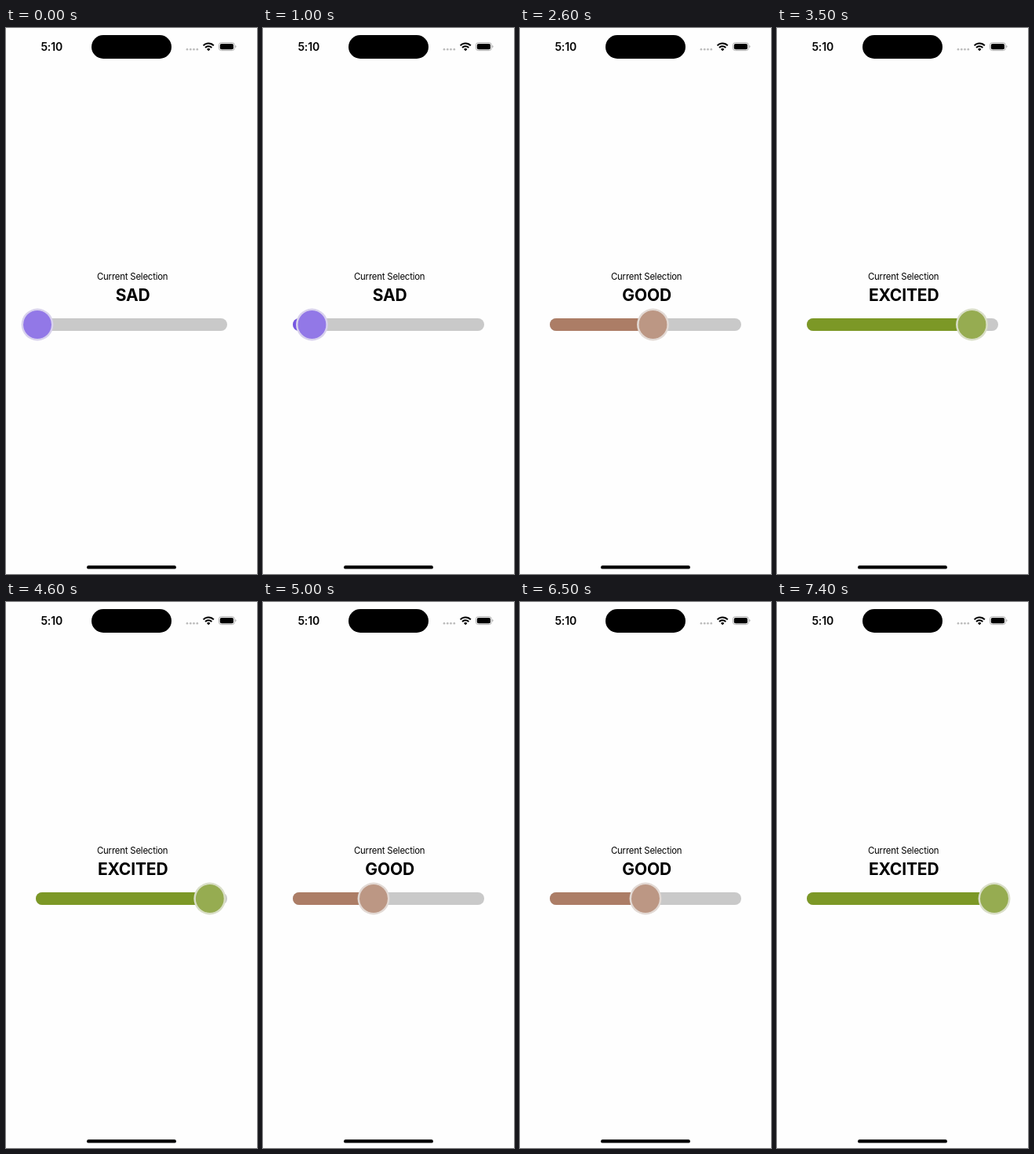
An HTML page for the animation above (8000 ms loop, 320 by 694 pixels).

```html
<!DOCTYPE html>
<html lang="en">
<head>
<meta charset="utf-8">
<title>Mood slider</title>
<style>
  html, body { margin: 0; width: 100%; height: 100%; overflow: hidden; background: #fefefe; }
  svg { display: block; width: 100%; height: 100%; }
  text { font-family: Inter, Roboto, sans-serif; text-anchor: middle; }
</style>
</head>
<body>
<svg viewBox="0 0 320 694">
  <defs>
    <clipPath id="trackClip"><rect x="38" y="369" width="244" height="16" rx="8"/></clipPath>
  </defs>
  <rect width="320" height="694" fill="#fefefe"/>

  <!-- Status bar -->
  <text x="58.3" y="28.7" font-size="14" font-weight="600" letter-spacing="-0.1">5:10</text>
  <rect x="109" y="9" width="102" height="30" rx="15"/>
  <g fill="#bdbdbd">
    <circle cx="231" cy="27.2" r="1.35"/>
    <circle cx="235.3" cy="27.2" r="1.35"/>
    <circle cx="239.5" cy="27.2" r="1.35"/>
    <circle cx="243.8" cy="27.2" r="1.35"/>
  </g>
  <g fill="none" stroke="#000" stroke-width="2">
    <path d="M251.6 22.4a9.1 9.1 0 0 1 13.2 0"/>
    <path d="M254.1 25a5.7 5.7 0 0 1 8.2 0"/>
  </g>
  <path d="M256 26.9a3 3 0 0 1 4.4 0l-2.2 2.3z"/>
  <rect x="271.4" y="18.6" width="20" height="10" rx="3.2" fill="none" stroke="#a8a8a8" stroke-width=".9"/>
  <rect x="272.8" y="20" width="17.2" height="7.2" rx="2"/>
  <path d="M292.4 22v3.2a1.7 1.7 0 0 0 0-3.2z" fill="#a8a8a8"/>

  <!-- Slider -->
  <text x="161.2" y="320" font-size="11.4" letter-spacing="-0.2">Current Selection</text>
  <text id="label" x="161.7" y="347.4" font-size="21" font-weight="700" letter-spacing="-0.15"></text>
  <g clip-path="url(#trackClip)">
    <rect x="38" y="369" width="244" height="16" fill="#c9c9c9"/>
    <rect id="fill" class="tint" x="38" y="369" height="16"/>
  </g>
  <g id="thumb">
    <circle r="20.4" fill="#f0f0f0"/>
    <circle class="tint" r="20.4" opacity=".2"/>
    <circle r="18" fill="#fefefe"/>
    <circle class="tint" r="18" opacity=".8"/>
  </g>

  <rect x="103" y="683.2" width="114" height="4.4" rx="2.2"/>
</svg>
<script>
  const LOOP = 8000, STEP = 100;

  // Upper limit of thumb position, label, colour
  const moods = [
    [79, 'SAD', '#7757e2'],
    [134, 'BORED', '#d06732'],
    [189, 'GOOD', '#ac7d66'],
    [245, 'HAPPY', '#f3c21f'],
    [Infinity, 'EXCITED', '#7c9826']
  ];

  // Drag path: time in ms, thumb centre
  const path = [
    [0, 40], [400, 40], [1300, 77.5], [1700, 93], [2600, 169.5], [3100, 211.5],
    [3500, 248.5], [4000, 270.5], [4500, 270.5], [5000, 141], [5200, 115], [5300, 115],
    [5800, 242], [6100, 242], [6500, 160], [7100, 160], [7400, 277], [LOOP, 277]
  ];

  const slope = i => path[i + 1]
    ? (path[i + 1][1] - path[i][1]) / (path[i + 1][0] - path[i][0]) : 0;

  // Harmonic mean keeps the curve free of overshoot
  function tangent(i) {
    if (i === 0) return 0;
    const a = slope(i - 1), b = slope(i);
    return a * b > 0 ? 2 * a * b / (a + b) : 0;
  }

  function thumbAt(t) {
    let i = 0;
    while (i < path.length - 2 && t >= path[i + 1][0]) i++;
    const [t0, x0] = path[i], [t1, x1] = path[i + 1];
    const d = t1 - t0, u = (t - t0) / d, v = 1 - u;
    return x0 * (1 + 2 * u) * v * v + x1 * u * u * (3 - 2 * u)
      + d * u * v * (tangent(i) * v - tangent(i + 1) * u);
  }

  const get = id => document.getElementById(id);
  const label = get('label'), fill = get('fill'), thumb = get('thumb');
  const tinted = document.querySelectorAll('.tint');

  function draw(ms) {
    const t = Math.floor((ms % LOOP) / STEP) * STEP;
    const x = thumbAt(t);
    const [, name, color] = moods.find(m => x < m[0]);
    label.textContent = name;
    fill.setAttribute('width', x - 38);
    thumb.setAttribute('transform', `translate(${x} 377)`);
    tinted.forEach(el => el.setAttribute('fill', color));
  }

  const start = performance.now();
  function tick() {
    draw(performance.now() - start);
    requestAnimationFrame(tick);
  }
  tick();
</script>
</body>
</html>
```
